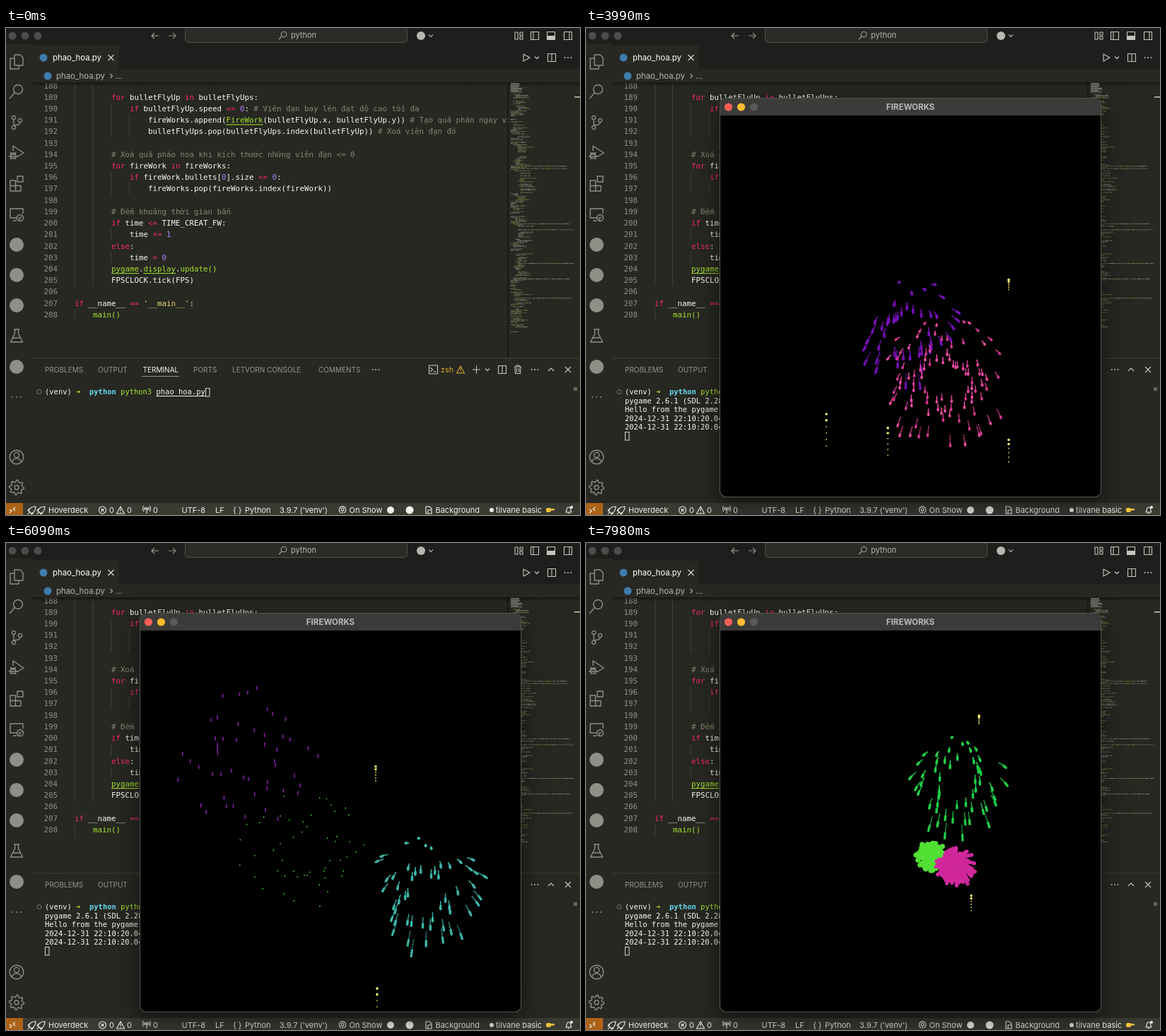
These frames come from a looping animation (812 px wide and 690 px high, 8 s). An HTML page with a canvas:

```html
<!DOCTYPE html>
<html lang="en">
<head>
<meta charset="utf-8">
<title>Fireworks</title>
<style>
html, body { margin: 0; width: 100%; height: 100%; overflow: hidden; background: #272822; }
canvas { display: block; width: 812px; height: 690px; }
</style>
</head>
<body>
<canvas id="stage" width="812" height="690"></canvas>
<script>
const W = 812, H = 690, LOOP = 8000, STEP = 70, TICK = 1000 / 60;
const MONO = '"DejaVu Sans Mono", monospace', SANS = 'Inter, sans-serif';
const stage = document.getElementById('stage').getContext('2d');
let ctx = stage;

// ---------- drawing helpers ----------
function layer(paint) {
  const c = document.createElement('canvas');
  c.width = W; c.height = H;
  ctx = c.getContext('2d');
  paint();
  ctx = stage;
  return c;
}
function rect(x, y, w, h, color) {
  ctx.fillStyle = color;
  ctx.fillRect(x, y, w, h);
}
function rounded(x, y, w, h, r, color) {
  ctx.beginPath();
  ctx.roundRect(x, y, w, h, r);
  ctx.fillStyle = color;
  ctx.fill();
}
function disc(x, y, r, color) {
  ctx.beginPath();
  ctx.arc(x, y, r, 0, 7);
  ctx.fillStyle = color;
  ctx.fill();
}
function text(s, x, midY, color, size, family = SANS, weight = 400) {
  ctx.font = `${weight} ${size}px ${family}`;
  ctx.fillStyle = color;
  ctx.fillText(s, x, midY + size * 0.35);
}
function icon(d, x, y, color = '#c5c5c0', width = 1.1) {
  ctx.save();
  ctx.translate(x, y);
  ctx.strokeStyle = color;
  ctx.lineWidth = width;
  ctx.lineJoin = 'round';
  ctx.stroke(new Path2D(d));
  ctx.restore();
}
const ring = (x, y, r) => `M${x + r} ${y}a${r} ${r} 0 1 1 ${-2 * r} 0a${r} ${r} 0 1 1 ${2 * r} 0`;
function dots(x, y, color, gap = 4.3) {
  for (const k of [-1, 0, 1]) disc(x + k * gap, y, 1, color);
}
function random(seed) {
  return () => {
    seed = (seed * 1664525 + 1013904223) >>> 0;
    return seed / 4294967296;
  };
}

// ---------- icons ----------
const ICON = {
  files: 'M-3-10h8l4 4v11H-3zM-3-5h-6v15H3V5',
  search: ring(2, -3, 6.5) + 'M-3 2L-10 10',
  branch: ring(-4, -7, 2.6) + ring(-4, 7, 2.6) + ring(5, -3, 2.6) + 'M-4-4V4M5 0C5 4-1 3-4 4',
  debug: 'M-5-3V-10L10 0L0 6' + ring(-5, 4, 3.8) + 'M-9 2h8M-11 5h12M-9-1l2 2M-1-1l-2 2M-9 9l2-2M-1 9l-2-2',
  blocks: 'M-9-4h7.500v7.500h7.500V11H-9zM-9 3.500h7.500V11M1-10h8v8H1z',
  remote: 'M0 5h-9V-8H9v7M-5 9h5' + ring(5, 5, 4.5) + 'M3 4l2 2l-2 2M7 3l-1 2',
  flask: 'M-4-9h8M-2.500-9v6l-6 12h17l-6-12v-6M-5.500 3h11',
  person: ring(0, 0, 9.8) + ring(0, -3, 3.6) + 'M-6.500 7a6.700 6.700 0 0 1 13 0',
  down: 'M-3-1.500L0 1.500L3-1.500',
  up: 'M-4 2L0-2L4 2',
  close: 'M-4-4L4 4M4-4L-4 4',
  plus: 'M-5.500 0h11M0-5.500v11',
  split: 'M-5.500-5.500h11v11h-11zM0-5.500v11',
  trash: 'M-5-4h10M-2-4v-2h4v2M-4-4l.5 9.500h7l.5-9.500M-1.500-2v5.500M1.500-2v5.500',
  shell: 'M-6-6h12v12h-12zM-4-3l3 3l-3 3M0 3h4',
  warn: 'M0-5L5.500 5h-11zM0-2v3.500M0 3v1',
  error: ring(0, 0, 5) + 'M-2-2L2 2M2-2L-2 2',
  tower: ring(0, -2, 1.4) + 'M0 0v5M-2.500 0a3 3 0 0 1 0-4M2.500 0a3 3 0 0 0 0-4M-4 2a6 6 0 0 1 0-8M4 2a6 6 0 0 0 0-8',
  cast: 'M-2 4a4.800 4.800 0 1 1 4 0M-1 1a2 2 0 1 1 2 0M0 0v5',
  page: 'M-4-5h5l3 3v7h-8zM-1 0h5v5h-5z',
  bell: 'M-4 3c2-2 0-7 4-7s2 5 4 7zM-1.500 4.500h3',
  rocket: 'M-5 1C-3-4 1-5 5-5C5-1 3 3-1 5zM-5 1l-1 0l2-3M-1 5l0 1l3-2M-4 3l-2 3',
  swap: 'M-4-1l3 2.500l-3 2.500M4-4l-3 2.500l3 2.500'
};
function gear(r) {
  let d = '';
  for (let i = 0; i < 32; i++) {
    const a = i * Math.PI / 16, q = i % 4 < 2 ? r : r * 0.74;
    d += `${i ? 'L' : 'M'}${(q * Math.cos(a)).toFixed(2)} ${(q * Math.sin(a)).toFixed(2)}`;
  }
  return d + 'Z' + ring(0, 0, 3);
}

// ---------- editor ----------
const INK = { w: '#f8f8f2', k: '#f92672', g: '#a6e22e', u: '#a6e22e', n: '#ae81ff', s: '#e6db74', c: '#88846f' };
const CODE = {
  189: '8~kfor ~wbulletFlyUp ~kin ~wbulletFlyUps:',
  190: '12~kif ~wbulletFlyUp.speed ~k<= ~n0~w: ~c# Viên đạn bay lên đạt độ cao tối đa',
  191: '16~wfireWorks.append(~uFireWork~w(bulletFlyUp.x, bulletFlyUp.y)) ~c# Tạo quả pháo ngay vị trí đó',
  192: '16~wbulletFlyUps.pop(bulletFlyUps.index(bulletFlyUp)) ~c# Xoá viên đạn đó',
  194: '8~c# Xoá quả pháo hoa khi kích thước những viên đạn <= 0',
  195: '8~kfor ~wfireWork ~kin ~wfireWorks:',
  196: '12~kif ~wfireWork.bullets[~n0~w].size ~k<= ~n0~w:',
  197: '16~wfireWorks.pop(fireWorks.index(fireWork))',
  199: '8~c# Đếm khoảng thời gian bắn',
  200: '8~kif ~wtime ~k<= ~wTIME_CREAT_FW:',
  201: '12~wtime ~k+= ~n1',
  202: '8~kelse~w:',
  203: '12~wtime ~k= ~n0',
  204: '8~upygame~w.~udisplay~w.~gupdate()',
  205: '8~wFPSCLOCK.tick(FPS)',
  207: "0~kif ~w__name__ ~k== ~s'__main__'~w:",
  208: '4~gmain()'
};
const lineY = n => 98 + (n - 189) * 16.21;

function paintCode() {
  const cell = 6.5, left = 97;
  ctx.save();
  ctx.beginPath();
  ctx.rect(37, 78, 674, 388);
  ctx.clip();
  const guide = (x, a, b) => rect(x, lineY(a) - 8, 1, (b - a + 1) * 16.21, '#3f403a');
  guide(97, 188, 205); guide(122, 188, 205); guide(97, 208, 208);
  for (const [a, b] of [[190, 192], [196, 197], [201, 201], [203, 203]]) guide(148, a, b);
  guide(174, 191, 192); guide(174, 197, 197);
  for (let n = 188; n <= 208; n++) {
    text(n, 53.500, lineY(n), '#90908a', 10.8, MONO);
    if (!CODE[n]) continue;
    const [indent, ...tokens] = CODE[n].split('~');
    let col = +indent;
    for (const token of tokens) {
      const s = token.slice(1), x = left + col * cell, color = INK[token[0]];
      text(s, x, lineY(n), color, 10.8, MONO);
      if (token[0] === 'u') rect(x, lineY(n) + 6, s.length * cell, 1, color);
      col += s.length;
    }
  }
  ctx.restore();
  const fade = ctx.createLinearGradient(0, 77, 0, 83);
  fade.addColorStop(0, 'rgba(0,0,0,.45)');
  fade.addColorStop(1, 'rgba(0,0,0,0)');
  rect(37, 77, 775, 6, fade);
}

function paintMinimap() {
  const rnd = random(11);
  const tints = ['#b9bab2', '#b9bab2', '#a09f88', '#8fae42', '#a39a62', '#88846f'];
  rect(709, 78, 2, 389, 'rgba(0,0,0,.35)');
  ctx.globalAlpha = 0.6;
  let level = 0;
  for (let i = 0; i < 208; i++) {
    const y = 78 + i * 1.7;
    if (i < 8) { rect(714, y, 10 + rnd() * 8, 1, '#d0d0c8'); continue; }
    level = i % 23 === 0 ? 0 : Math.max(0, Math.min(4, level + Math.floor(rnd() * 3) - 1));
    if (rnd() < 0.22) continue;
    let x = 714 + level * 3.4;
    const end = Math.min(803, x + 5 + (rnd() < 0.05 ? 75 : rnd() * 18));
    while (x < end) {
      const w = Math.min(end - x, 2 + rnd() * 6);
      rect(x, y, w, 1, tints[Math.floor(rnd() * tints.length)]);
      x += w + 1;
    }
  }
  ctx.globalAlpha = 1;
  rect(804, 97, 8, 1.500, '#c8c8c0');
}

function paintTop() {
  rect(0, 0, W, 22, '#1e1f1c');
  rect(37, 22, W, 36, '#1e1f1c');
  rect(37, 25, 123, 34, '#272822');
  for (const x of [9, 27, 45]) disc(x, 11, 5.5, '#4c4d4a');
  icon('M5 0H-5M-1-4L-5 0L-1 4', 211, 11, '#a0a09a');
  icon('M-5 0H5M1-4L5 0L1 4', 235, 11, '#8a8a84');
  rounded(253, -1, 315, 22, 5, '#50514b');
  rounded(254, 0, 313, 20, 4, '#2b2c28');
  icon(ring(1, -1, 3.8) + 'M-2 2L-6 6', 392, 10, '#a5a59f');
  text('python', 403, 10.5, '#b4b4ae', 11);
  disc(587, 11, 6, '#b8b8b2');
  icon(ICON.down, 601, 11, '#aaa');
  icon('M-5-5h4v10h-4zM2-5h4v4h-4zM2 1h4v4h-4z', 725, 11);
  for (const x of [748, 771, 795]) icon('M-5.500-5.500h11v11h-11z', x, 11);
  icon('M-2-5v11', 748, 11);
  rect(766, 11, 10, 5, '#c5c5c0');
  icon('M2-5v11', 795, 11);

  disc(53, 42, 5.5, '#3f7cac');
  text('phao_hoa.py', 66, 42, '#ffffff', 11.4);
  icon(ICON.close, 148.500, 42, '#ddd');
  icon('M-4-5L5 0L-4 5z', 736, 42);
  icon(ICON.down, 751, 42);
  icon(ICON.split, 772, 42);
  dots(795, 42, '#c5c5c0');
  disc(59, 68, 5.5, '#3f7cac');
  text('phao_hoa.py', 71, 68, '#b5b5ae', 11.4);
  icon('M-1.500-3L1.500 0L-1.500 3', 149, 68, '#aaa');
  text('...', 155, 68, '#b5b5ae', 11.4);
}

function paintSidebar() {
  const color = '#8e8f87';
  const rows = [['files', 48], ['search', 90], ['branch', 134], ['debug', 177], ['blocks', 220],
    ['remote', 264], ['flask', 436], ['person', 608]];
  for (const [name, y] of rows) icon(ICON[name], 15, y, color, 1.4);
  for (const y of [307, 350, 393, 480]) disc(15, y, 10, color);
  dots(15, 523, color, 6);
  icon(gear(10.5), 15, 651, color, 1.4);
}

function paintPanel() {
  rect(37, 467.500, 775, 1, '#414339');
  const tabs = [['PROBLEMS', 55], ['OUTPUT', 130], ['TERMINAL', 193.500], ['PORTS', 265],
    ['LETVORN CONSOLE', 320], ['COMMENTS', 442]];
  for (const [name, x] of tabs) text(name, x, 484, name === 'TERMINAL' ? '#f4f4ee' : '#94958d', 10);
  rect(192, 493, 53, 1, '#9a9a80');
  dots(523, 484, '#c5c5c0');
  icon(ICON.shell, 604.500, 484);
  text('zsh', 615, 484, '#d7a72c', 10.8);
  icon(ICON.warn, 643, 484, '#d7a72c');
  icon(ICON.plus, 665.500, 484);
  icon(ICON.down, 681, 484);
  icon(ICON.split, 702, 484);
  icon(ICON.trash, 724, 484);
  dots(748, 484, '#c5c5c0');
  icon(ICON.up, 771, 484);
  icon(ICON.close, 795, 484);
  rect(803, 509, 5, 5, '#66675f');
}

function paintStatus() {
  const ink = '#f0f0ea', y = 683;
  const put = (s, x) => text(s, x, y, ink, 11);
  rect(0, 673, W, 17, '#393a32');
  rect(0, 673, 24, 17, '#ac6218');
  icon(ICON.swap, 9, y, ink);
  icon(ICON.rocket, 37, y, ink);
  icon(ICON.rocket, 50, y, ink);
  put('Hoverdeck', 60);
  icon(ICON.error, 136.500, y, ink);
  put('0', 146);
  icon(ICON.warn, 162, y, ink);
  put('0', 171);
  icon(ICON.tower, 199, y, ink);
  put('0', 208);
  put('UTF-8', 248.500);
  put('LF', 296);
  put('{ }', 321);
  put('Python', 338);
  put("3.9.7 ('venv')", 387);
  icon(ICON.cast, 476, y, ink);
  put('On Show', 485.500);
  disc(544, y, 5, ink);
  disc(571, y, 5.5, ink);
  icon(ICON.page, 598, y, ink);
  put('Background', 607.500);
  disc(687, y, 3, ink);
  put('tilvane basic', 693);
  rounded(764, 680, 7, 6, 2, '#f5c33b');
  rounded(768, 681, 8, 2.500, 1, '#f5c33b');
  icon(ICON.bell, 796, y, ink);
  disc(800, 679, 2, ink);
}

const editor = layer(() => {
  rect(0, 0, W, H, '#272822');
  paintCode();
  paintMinimap();
  paintTop();
  paintSidebar();
  paintPanel();
  paintStatus();
});

// ---------- terminal ----------
const OUTPUT = [
  [1400, 'pygame 2.6.1 (SDL 2.28.4, Python 3.9.7)'],
  [1400, 'Hello from the pygame community. https:\/\/www.pygame.org/contribute.html'],
  [2240, '2024-12-31 22:10:20.042 python3[4127:58210] +[IMKClient subclass]: chose IMKClient_Modern'],
  [2240, '2024-12-31 22:10:20.042 python3[4127:58210] +[IMKInputSession subclass]: chose IMKInputSession_Modern']
];
const rowY = n => 515.500 + n * 12.55;

function drawTerminal(t) {
  const cell = 6.3, at = col => 55 + col * cell;
  const put = (s, col, row, color, weight) => text(s, at(col), rowY(row), color, 10.46, MONO, weight);
  icon(ring(0, 0, 3), 47, 515.500, '#77786f', 1);
  put('(venv)', 0, 0, INK.w);
  put('➜', 7, 0, INK.g, 700);
  put('python', 10, 0, '#66d9ef', 700);
  put('python3', 17, 0, INK.g);
  put('phao_hoa.py', 25, 0, INK.w);
  rect(at(25), 521, 11 * cell, 1, INK.w);
  const shown = OUTPUT.filter(([start]) => t >= start);
  shown.forEach(([, line], i) => put(line, 0, i + 1, INK.w));
  const row = shown.length ? shown.length + 1 : 0;
  ctx.strokeStyle = '#d8d8d0';
  ctx.lineWidth = 1;
  ctx.strokeRect(Math.round(at(row ? 0 : 36)) + 0.5, Math.round(rowY(row) - 6) + 0.5, 5.5, 11.5);
}

// ---------- game window ----------
const OPENED = 2240, FLOOR = 664;
const gameWindow = layer(() => {
  ctx.shadowColor = 'rgba(0,0,0,.5)';
  ctx.shadowBlur = 36;
  ctx.shadowOffsetY = 12;
  rounded(189, 99, 540, 566, 9, '#55564f');
  ctx.shadowColor = 'transparent';
  rounded(190, 100, 538, 564, 8.5, '#000');
  rounded(190, 100, 538, 24, [8.5, 8.5, 0, 0], '#3b3b3a');
  disc(201.500, 112, 5.6, '#ff5f57');
  disc(219.500, 112, 5.6, '#febc2e');
  disc(237.500, 112, 5.6, '#5a5a59');
  ctx.textAlign = 'center';
  text('FIREWORKS', 459, 111.500, '#b9b9b7', 11.5, SANS, 700);
});

// x, launch time, burst time, apex y, burst colour
const ROCKETS = [
  [455, 2305, 3395, 388, '#7610b6'],
  [504, 2305, 3285, 448, '#ea4aa2'],
  [508, 2305, 3300, 446, '#d4388f'],
  [598, 3105, 4320, 332, '#efe08c'],
  [340, 3785, 5178, 235, '#8a22b0'],
  [427, 3790, 4975, 349, '#3edd2c'],
  [598, 3788, 4850, 430, '#7ae8a4'],
  [596, 4525, 5482, 452, '#3cb4a8'],
  [523, 5200, 6725, 244, '#28ce64'],
  [525, 6027, 7390, 300, '#20d048'],
  [490, 6767, 7850, 433, '#52e035'],
  [522, 6769, 7815, 448, '#d0289c'],
  [556, 6768, 8286, 227, '#3cb4a8'],
  [545, 7500, 8499, 439, '#8a22b0']
].map(([x, launch, burst, apex, color], i) => {
  const rnd = random(97 + i * 7919);
  const count = 44 + Math.floor(rnd() * 12), turn = rnd() * 7;
  const bullets = Array.from({ length: count }, (_, k) => ({
    angle: turn + k * 2 * Math.PI / count,
    speed: 1.8 + rnd() * 1.8
  }));
  return { x, launch, burst, apex, color, bullets };
});

const pellet = (x, y, size, color) => { if (size >= 1) disc(x, y, Math.floor(size) * 0.9, color); };

function drawRising(r, t) {
  for (let k = 5; k >= 0; k--) {
    const at = t - k * TICK;
    if (at < r.launch) continue;
    const left = (r.burst - at) / (r.burst - r.launch);
    pellet(r.x, r.apex + (FLOOR - r.apex) * left * left, 2.4 - k * 0.25, '#f5ee6e');
  }
}

function drawBurst(r, t) {
  const SLOW = 0.063, FALL = 1.35, SHRINK = 0.05;
  const age = Math.floor((t - r.burst) / TICK);
  if (age > 70) return;
  for (const { angle, speed } of r.bullets) {
    for (let k = Math.min(age, 14); k >= 0; k--) {
      const n = age - k, m = Math.min(n, speed / SLOW);
      const reach = speed * m - SLOW * m * m / 2;
      pellet(r.x + reach * Math.cos(angle), r.apex + reach * Math.sin(angle) + FALL * n,
        4.4 - SHRINK * n - 0.25 * k, r.color);
    }
  }
}

function drawGame(t) {
  ctx.drawImage(gameWindow, 0, 0);
  ctx.save();
  ctx.beginPath();
  ctx.rect(190, 124, 538, 540);
  ctx.clip();
  for (const r of ROCKETS) {
    if (t >= r.burst) drawBurst(r, t);
    else if (t >= r.launch) drawRising(r, t);
  }
  ctx.restore();
}

function render(now) {
  const t = Math.floor((now % LOOP) / STEP) * STEP;
  ctx.drawImage(editor, 0, 0);
  drawTerminal(t);
  if (t >= OPENED) drawGame(t);
}
function tick() {
  render(performance.now());
  requestAnimationFrame(tick);
}
tick();
</script>
</body>
</html>
```
